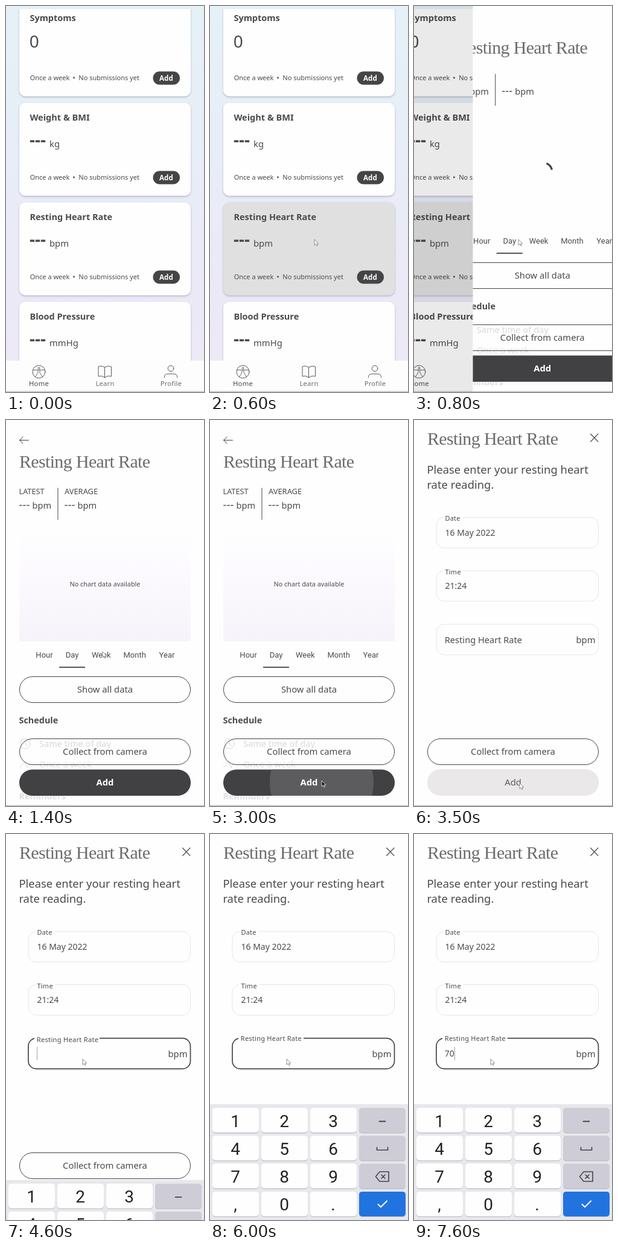
Write an HTML page that moves like this. It is 328 px wide and 640 px high and loops after 8000 ms.

```html
<!DOCTYPE html>
<html lang="en">
<head>
<meta charset="utf-8">
<title>Heart rate entry</title>
<style>
html, body { margin: 0; width: 100%; height: 100%; overflow: hidden; background: #fefefe; }
svg { display: block; width: 100vw; height: 100vh; }
text { font-family: "Noto Sans", sans-serif; fill: #4b4a4c; white-space: pre; }
.b { font-weight: 600; }
.m { font-weight: 500; }
.mid { text-anchor: middle; }
.head { font: 30px "Liberation Serif", serif; letter-spacing: -.66px; fill: #6c6c6c; }
.rob { font-family: Roboto, sans-serif; }
.lab { letter-spacing: .25px; }
.line { fill: none; stroke: #454446; stroke-linecap: round; stroke-linejoin: round; }
</style>
</head>
<body>
<svg id="stage" viewBox="0 0 328 640"></svg>
<script>
const LOOP = 8000, W = 328, INK = '#454446';

const text = (x, y, size, str, cls = '', extra = '') =>
  `<text x="${x}" y="${y}" font-size="${size}" class="${cls}" ${extra}>${str}</text>`;
const rect = (x, y, w, h, r, fill, extra = '') =>
  `<rect x="${x}" y="${y}" width="${w}" height="${h}" rx="${r}" fill="${fill}" ${extra}/>`;
const line = (d, width = 1, extra = '') =>
  `<path class="line" d="${d}" stroke-width="${width}" ${extra}/>`;
const outline = y => rect(22.5, y + .5, 283, 43, 21.5, 'none', `stroke="${INK}"`);
const floor = rect(0, 638.5, W, 1.5, 0, '#c9c9cb');

function card(y, title, unit, id = '') {
  const value = unit
    ? text(39, y + 72, 28, '---', 'b') + text(72, y + 74, 14.8, unit)
    : text(38.7, y + 74, 28, '0');
  return rect(22, y + .5, 284, 154, 10, '#fefefe', `filter="url(#soft)" ${id}`) +
    text(39.4, y + 30, 14.5, title, 'b') + value +
    text(39.7, y + 128, 11, 'Once a week') +
    `<circle cx="112.5" cy="${y + 124}" r="1.4" fill="${INK}"/>` +
    text(120.3, y + 128, 11, 'No submissions yet') +
    rect(243.5, y + 113.5, 44.5, 22, 11, INK) +
    text(265.4, y + 128.5, 11.6, 'Add', 'b mid', 'style="fill:#fff"');
}

const home = rect(-80, 0, 500, 640, 0, 'url(#sky)') +
  '<g clip-path="url(#list)">' +
  card(-5, 'Symptoms') + card(160, 'Weight &amp; BMI', 'kg') +
  card(325, 'Resting Heart Rate', 'bpm', 'id="pressed"') +
  card(490, 'Blood Pressure', 'mmHg') + '</g>' +
  rect(0, 588, W, 52, 0, '#fdfdfd') +
  '<circle class="line" cx="54.5" cy="606.5" r="10.5" stroke-width=".9"/>' +
  '<circle class="line" cx="54.5" cy="600.5" r="1.5" stroke-width=".8"/>' +
  line('M45 603.500H64M53 604V608L48.500 615M56 604V608L60.500 615', .8) +
  line('M163.5 599Q158 595.5 153 598V614Q158 612 163.5 616Q169 612 174.5 614V598Q169 595.5 163.5 599V616', .9) +
  '<circle class="line" cx="273" cy="601" r="4.8" stroke-width=".9"/>' +
  line('M262.5 616V614.5Q263 610 268 610H278Q283 610 283.5 614.5V616', .9) +
  text(54.5, 630, 11.3, 'Home', 'mid m lab') +
  text(164, 630, 11.2, 'Learn', 'mid lab', 'opacity=".8"') +
  text(273.5, 630, 11.2, 'Profile', 'mid lab', 'opacity=".8"') + floor;

const tabs = [['Hour', 63.5], ['Day', 109.5], ['Week', 157.8], ['Month', 213.2], ['Year', 266.5]]
  .map(([s, x]) => text(x, 394, 13, s, 'rob mid')).join('');

const reading = x => text(x, 147, 18.5, '---', 'm') + text(x + 22, 147, 14.6, 'bpm');

const detail = rect(-W, 0, 3 * W, 640, 0, '#fefefe') +
  line('M37.5 33.5H22.5L28 28M22.5 33.5L28 39') +
  text(22, 79, 30, 'Resting Heart Rate', 'head') +
  reading(21.5) + reading(96.5) + line('M86 113V165') +
  '<g id="loaded">' + text(21.5, 123, 12.7, 'LATEST') + text(97, 123, 12.9, 'AVERAGE') +
  rect(22, 195, 284, 172, 0, 'url(#chart)') +
  text(164, 276, 10.8, 'No chart data available', 'mid') + '</g>' +
  '<path id="spin" class="line" d="M170.8 261A15 15 0 0 1 179.7 271.5" stroke-width="3.4" style="stroke-linecap:butt"/>' +
  tabs + rect(88, 409, 43, 1.8, 0, INK) +
  outline(425) + text(164, 452, 14.8, 'Show all data', 'mid') +
  text(21.5, 503, 14.4, 'Schedule', 'b') +
  '<g opacity=".2"><circle class="line" cx="32" cy="537" r="8"/>' +
  line('M32 532V537L36 540M24 531L28 528M40 531L36 528') +
  text(55, 542, 14.6, 'Same time of day') + '</g>' +
  '<g opacity=".17">' + line('M22 575H25L30 565L35 577L38 571H42') +
  text(55, 576, 14.6, 'Once a week') + text(21.5, 629, 14.4, 'Reminders', 'b') + '</g>' +
  outline(528) + text(164, 555, 14.8, 'Collect from camera', 'mid') +
  rect(22, 579.5, 284, 43.5, 21.5, '#414043') +
  '<circle id="ripple" cx="185" cy="601" r="86" fill="#5c5b5d" clip-path="url(#pill)"/>' +
  text(164, 606, 14.8, 'Add', 'b mid', 'style="fill:#fff"') + floor;

const box = (y, attrs = '') =>
  rect(37, y + .7, 268.5, 50.6, 13, 'none', `stroke="#e6e5e7" ${attrs}`);
const gap = (x, y, w) => rect(x, y - 2, w, 5, 0, '#fefefe');

const form = rect(-W, 0, 3 * W, 640, 0, '#fefefe') +
  text(22, 41, 30, 'Resting Heart Rate', 'head') +
  line('M292.5 23L305 36M305 23L292.5 36', 1.1) +
  text(21.4, 88.5, 18.4, 'Please enter your resting heart') +
  text(21.4, 113.5, 18.4, 'rate reading.') +
  box(161) + gap(48, 161, 32) + text(51.4, 167, 11, 'Date', 'lab') +
  text(51.5, 192, 14, '16 May 2022') +
  box(249) + gap(48, 249, 33) + text(51.4, 255.5, 11, 'Time', 'lab') +
  text(51.5, 280, 14, '21:24') +
  box(338, 'id="field"') + '<g id="notch">' + gap(47, 338, 108) + '</g>' +
  text(50.8, 370, 14.6, 'Resting Heart Rate', '', 'id="label"') +
  text(50.8, 369, 14, '', '', 'id="typed"') +
  rect(51, 353, 1, 22, 0, '#a3a2a4', 'id="caret"') +
  text(300.5, 370, 14.8, 'bpm', '', 'text-anchor="end"') +
  outline(528) + text(164, 555, 14.8, 'Collect from camera', 'mid') +
  rect(22, 579, 284, 44, 21.5, '#eae8e9') +
  text(164, 606, 14.8, 'Add', 'm mid', 'opacity=".9"') + floor;

function keyboard() {
  let out = rect(0, 448, W, 200, 0, '#e7e8ec');
  ['123-', '456_', '789<', ',0.>'].forEach((row, r) => [...row].forEach((key, c) => {
    const x = 4 + 81 * c, y = 454 + 46.3 * r;
    const fill = key === '>' ? '#2173df' : c === 3 ? '#cecdd7' : '#fefefe';
    out += rect(x, y + 1.2, 77, 41, 5, '#b9bac1') + rect(x, y, 77, 41, 5, fill);
    if (c < 3) out += text(x + 38, y + 31.5, 28, key, 'rob mid', 'style="fill:#222"');
  }));
  return out + line('M280.5 476.5H290.5', 1.8) + line('M276.5 519.5V524H294.5V519.5', 1.7) +
    line('M281 560H296V576H281L274.5 568ZM284 565L290 571M290 565L284 571', 1.6) +
    line('M278.5 614L283 618.5L293 608.5', 2, 'style="stroke:#fff"');
}

const stops = list => list.map(([at, color]) => `<stop offset="${at}" stop-color="${color}"/>`).join('');
const gradient = (id, list) =>
  `<linearGradient id="${id}" x1="0" y1="0" x2="0" y2="1">${stops(list)}</linearGradient>`;
const page = (name, body) =>
  `<g id="${name}" clip-path="url(#${name}Clip)"><g id="${name}Body">${body}</g></g>`;
const pageClip = name =>
  `<clipPath id="${name}Clip"><rect id="${name}Edge" x="0" y="0" width="${W}" height="640"/></clipPath>`;

document.getElementById('stage').innerHTML = '<defs>' +
  gradient('sky', [[0, '#e5f1f6'], [.4, '#e8edf7'], [.75, '#ece9f7'], [1, '#eee9f5']]) +
  gradient('chart', [[0, '#fefdfe'], [.3, '#fcfafe'], [1, '#f6f4fa']]) +
  '<filter id="soft" x="-5%" y="-5%" width="110%" height="115%"><feDropShadow dx="0" dy="1.5" stdDeviation="1.4" flood-color="#50506e" flood-opacity=".38"/></filter>' +
  `<clipPath id="list"><rect x="0" y="5" width="${W}" height="583"/></clipPath>` +
  '<clipPath id="pill"><rect x="22" y="579.5" width="284" height="43.5" rx="21.5"/></clipPath>' +
  pageClip('detail') + pageClip('form') + '</defs>' +
  `<g id="home">${home}</g>` + rect(0, 0, W, 640, 0, '#000', 'id="dim1"') +
  page('detail', detail) + rect(0, 0, W, 640, 0, '#000', 'id="dim2"') +
  page('form', form) + `<g id="keys">${keyboard()}</g>` +
  '<path id="mouse" d="M0 0V9.5L2.3 7.5L3.8 10.8L5.3 10.1L3.8 7H6.8Z" stroke-width=".8"/>';

const el = {};
document.querySelectorAll('[id]').forEach(n => el[n.id] = n);
const set = (id, attrs) => { for (const k in attrs) el[id].setAttribute(k, attrs[k]); };
const show = (id, on) => { el[id].style.display = on ? '' : 'none'; };
const clamp = v => Math.max(0, Math.min(1, v));
const easeOut = (t, start, length, power) => 1 - (1 - clamp((t - start) / length)) ** power;

// time, x, y of the pointer
const path = [
  [500, 173, 387], [1300, 173, 387], [1400, 160, 384], [1500, 160, 384],
  [1600, 155, 330], [1800, 152, 160], [2200, 206, 530], [2300, 206, 530],
  [2600, 185, 598], [3100, 185, 598], [3300, 175, 602], [3500, 175, 602],
  [3800, 118, 388], [4300, 127, 373], [LOOP, 127, 373]
];

function pointer(t) {
  const i = Math.max(1, path.findIndex(p => p[0] >= t));
  const [t0, x0, y0] = path[i - 1], [t1, x1, y1] = path[i];
  const u = clamp((t - t0) / (t1 - t0));
  return [x0 + (x1 - x0) * u, y0 + (y1 - y0) * u];
}

// New page is uncovered from the right while the old one drifts left.
function push(t, start, under, dim, over) {
  const p = easeOut(t, start, 400, 1.75), edge = W * (1 - p);
  set(under, { transform: `translate(${-.2 * W * p})` });
  set(over + 'Edge', { x: edge });
  set(over + 'Body', { transform: `translate(${edge / 2})` });
  set(dim, { opacity: .11 * p });
  show(over, p > 0);
  show(dim, p > 0 && p < 1);
}

function draw(t) {
  push(t, 600, 'home', 'dim1', 'detail');
  if (t >= 3100) push(t, 3100, 'detailBody', 'dim2', 'form');
  else { show('form', false); show('dim2', false); }

  set('pressed', { fill: t >= 500 ? '#e0e0e1' : '#fefefe' });
  show('loaded', t >= 1200);
  show('spin', t < 1200);
  set('spin', { transform: `rotate(${(t - 800) * .4} 164 272)` });
  show('ripple', t >= 3000);
  set('ripple', { r: 86 + Math.max(0, t - 3000) * .84 });

  const focus = t >= 4500, k = easeOut(t, 4400, 320, 3);
  set('field', { stroke: focus ? INK : '#e6e5e7', 'stroke-width': focus ? 1.7 : 1 });
  show('notch', focus);
  set('label', { y: 370 - 26.6 * k, 'font-size': 14.6 - 3.6 * k, 'letter-spacing': .25 * k });

  const typed = '70'.slice(0, t >= 7600 ? 2 : t >= 7500 ? 1 : 0);
  el.typed.textContent = typed;
  set('caret', { x: 51 + 8 * typed.length });
  show('caret', focus && Math.floor(t / 500) % 2 === 1);

  show('keys', focus);
  set('keys', { transform: `translate(0 ${192 * (1 - easeOut(t, 4500, 500, 1.9))})` });

  const [x, y] = pointer(t), dark = t >= 2500 && t < 3200;
  show('mouse', t >= 500);
  set('mouse', {
    transform: `translate(${x} ${y})`,
    fill: dark ? '#111' : '#fff', stroke: dark ? '#fff' : '#777'
  });
}

const began = performance.now();
function tick() {
  const ms = (performance.now() - began) % LOOP;
  draw(Math.floor(ms / 100) * 100); // ten pictures a second
  requestAnimationFrame(tick);
}
tick();
</script>
</body>
</html>
```
